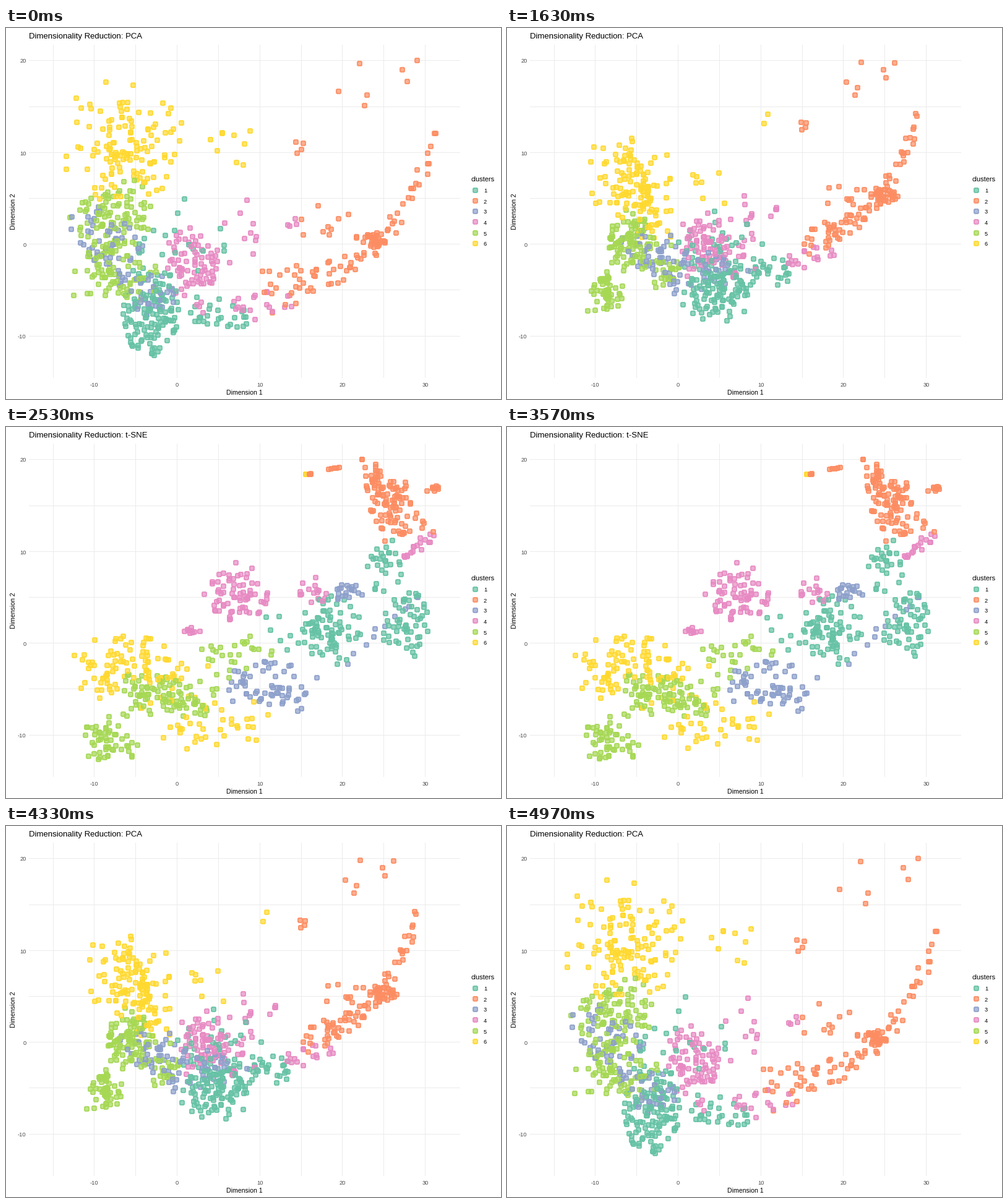
These frames come from a looping animation (800x600 px, 5000 ms). A matplotlib script:

```python
import numpy as np
import matplotlib.pyplot as plt
from matplotlib.animation import FuncAnimation

W, H = 800, 600
PX = 0.72                      # points per pixel at 100 dpi
STEP, LOOP = 20, 5000
TEAL, ORANGE, BLUE, PINK, GREEN, YELLOW = COLORS = [
    "#66C2A5", "#FC8D62", "#8DA0CB", "#E78AC3", "#A6D854", "#FFD92F"]

rng = np.random.default_rng(5)
pca_parts, tsne_parts, colors = [], [], []


def spread(spine, radii, n):
    """n random places in an ellipse carried along a spine of one or more points."""
    spine = np.atleast_2d(np.asarray(spine, float))
    u = np.linspace(0, len(spine) - 1, n)
    knots = np.arange(len(spine))
    base = np.column_stack([np.interp(u, knots, spine[:, k]) for k in (0, 1)])
    angle = rng.uniform(0, 2 * np.pi, n)
    reach = rng.random(n) ** 0.6
    ring = np.column_stack([np.cos(angle), np.sin(angle)])
    return base + ring * reach[:, None] * radii


def group(color, n, pca, pca_radii, tsne, tsne_radii):
    pca_parts.append(spread(pca, pca_radii, n))
    tsne_parts.append(spread(tsne, tsne_radii, n))
    colors.extend([color] * n)


group(TEAL, 66, (232, 455), (48, 78), (526, 328), (48, 58))
group(TEAL, 56, (235, 468), (46, 62), (645, 318), (40, 56))
group(TEAL, 28, [(295, 458), (395, 468)], (14, 28), (612, 222), (32, 48))
group(TEAL, 18, (285, 345), (75, 70), (490, 325), (85, 48))

# cluster 2 follows a bent tail that folds into a wedge
u = np.linspace(0, 1, 80)
tail = np.column_stack([415 + 280 * u, 430 - 75 * u - 185 * u ** 4])
tail_radii = np.column_stack([12 + 0 * u, 14 + 32 * (1 - u) ** 2])
wedge = np.column_stack([645 - 57 * u, 163 - 93 * u])
wedge_radii = np.column_stack([10 + 42 * (1 - u), 20 + 0 * u])
group(ORANGE, 80, tail, tail_radii, wedge, wedge_radii)
group(ORANGE, 20, (590, 341), (26, 14), (632, 105), (28, 26))
group(ORANGE, 9, (590, 343), (20, 9), (688, 102), (13, 9))
group(ORANGE, 9, (515, 312), (52, 38), (615, 160), (35, 25))
group(ORANGE, 4, (473, 187), (9, 20), (491, 75), (2, 1))
group(ORANGE, 5, [(579, 125), (583, 108), (648, 86), (640, 67), (664, 52)], 0,
      [(521, 68), (538, 65)], 0)
group(ORANGE, 2, [(571, 57), (537, 102)], 0, (575, 52), 0)

group(BLUE, 60, [(125, 310), (215, 390)], (36, 46), [(380, 412), (480, 426)], (34, 40))
group(BLUE, 20, (238, 430), (38, 36), [(532, 266), (570, 266)], (8, 13))
group(BLUE, 10, (235, 435), (36, 32), [(548, 378), (668, 276)], (9, 9))

group(PINK, 58, (298, 375), (46, 54), (370, 272), (54, 44))
group(PINK, 13, (395, 315), (85, 55), (365, 255), (50, 40))
group(PINK, 16, (330, 415), (60, 55), (500, 265), (32, 24))
group(PINK, 17, [(365, 458), (452, 440)], (20, 22), [(645, 212), (688, 172)], (10, 10))
group(PINK, 10, (315, 400), (45, 50), (302, 330), (18, 7))

group(GREEN, 96, [(150, 315), (200, 300)], (55, 60), [(322, 440), (190, 432)], (26, 36))
group(GREEN, 52, [(130, 395), (180, 395)], (40, 46), [(185, 510), (138, 504)], (34, 40))
group(GREEN, 26, (212, 395), (38, 48), (372, 370), (60, 36))

group(YELLOW, 76, [(140, 200), (240, 200)], (55, 76), [(262, 385), (130, 392)], (40, 52))
group(YELLOW, 40, [(130, 205), (255, 205)], (44, 72), [(405, 478), (250, 478)], (42, 46))
group(YELLOW, 12, (185, 120), (92, 54), (190, 385), (110, 50))
group(YELLOW, 7, (363, 195), (42, 32), (230, 400), (100, 60))
group(YELLOW, 2, [(394, 166), (385, 187)], 0, (484, 76), 0)

order = rng.permutation(len(colors))
pca = np.vstack(pca_parts)[order]
tsne = np.vstack(tsne_parts)[order]
colors = np.array(colors)[order]

fig = plt.figure(figsize=(W / 100, H / 100), dpi=100, facecolor="white")
ax = fig.add_axes([0, 0, 1, 1])
ax.set_xlim(-0.5, W - 0.5)     # whole numbers fall on pixel centres
ax.set_ylim(H - 0.5, -0.5)
ax.axis("off")


def label(x, y, s, size, color="black", ha="center", **kw):
    return ax.text(x, y, s, fontsize=size * PX, color=color, ha=ha,
                   va="baseline", family="Liberation Sans", **kw)


def dots(xy, c):
    return ax.scatter(xy[:, 0], xy[:, 1], s=(8 * PX) ** 2, c=c, alpha=0.7,
                      linewidths=PX, edgecolors="face", antialiaseds=False, zorder=3)


def col(v):
    return np.round(276.1 + 13.365 * v)


def row(v):
    return np.round(349.2 - 14.84 * v)


grid = dict(colors="#EBEBEB", linewidths=PX, antialiaseds=False, snap=False, zorder=1)
ax.vlines(col(np.arange(-15, 31, 5)), 27, 565, **grid)
ax.hlines(row(np.arange(-10, 21, 5)), 37, 733, **grid)

for v in range(-10, 31, 10):
    label(col(v), 579, str(v), 9.3, "#4D4D4D")
for v in range(-10, 21, 10):
    label(32, row(v) + 4, str(v), 9.3, "#4D4D4D", ha="right")
label(384.5, 592.5, "Dimension 1", 10.5)
label(15, 296, "Dimension 2", 10.5, rotation=90, rotation_mode="anchor")

label(750.5, 247, "clusters", 11, ha="left")
keys = np.array([(758, np.round(261.5 + 17.28 * i)) for i in range(6)])
dots(keys, COLORS)
for i, (_, y) in enumerate(keys):
    label(774, y + 4, str(i + 1), 9.3)

title = label(36.5, 17, "", 13.15, ha="left")
cloud = dots(pca, colors)


def ease(t):
    t = min(max(t, 0), 1)
    return 4 * t ** 3 if t < 0.5 else 1 - 4 * (1 - t) ** 3


def update(i):
    k = round(i * STEP * 0.03)          # the motion advances at 30 steps a second
    p = ease((k - 30) / 45) - ease((k - 104) / 45)
    cloud.set_offsets(np.round(pca + (tsne - pca) * p))
    title.set_text("Dimensionality Reduction: " + ("t-SNE" if p > 0.5 else "PCA"))
    return cloud, title


anim = FuncAnimation(fig, update, frames=LOOP // STEP, interval=STEP,
                     init_func=lambda: update(0), repeat=True, repeat_delay=0)
plt.show()
```
